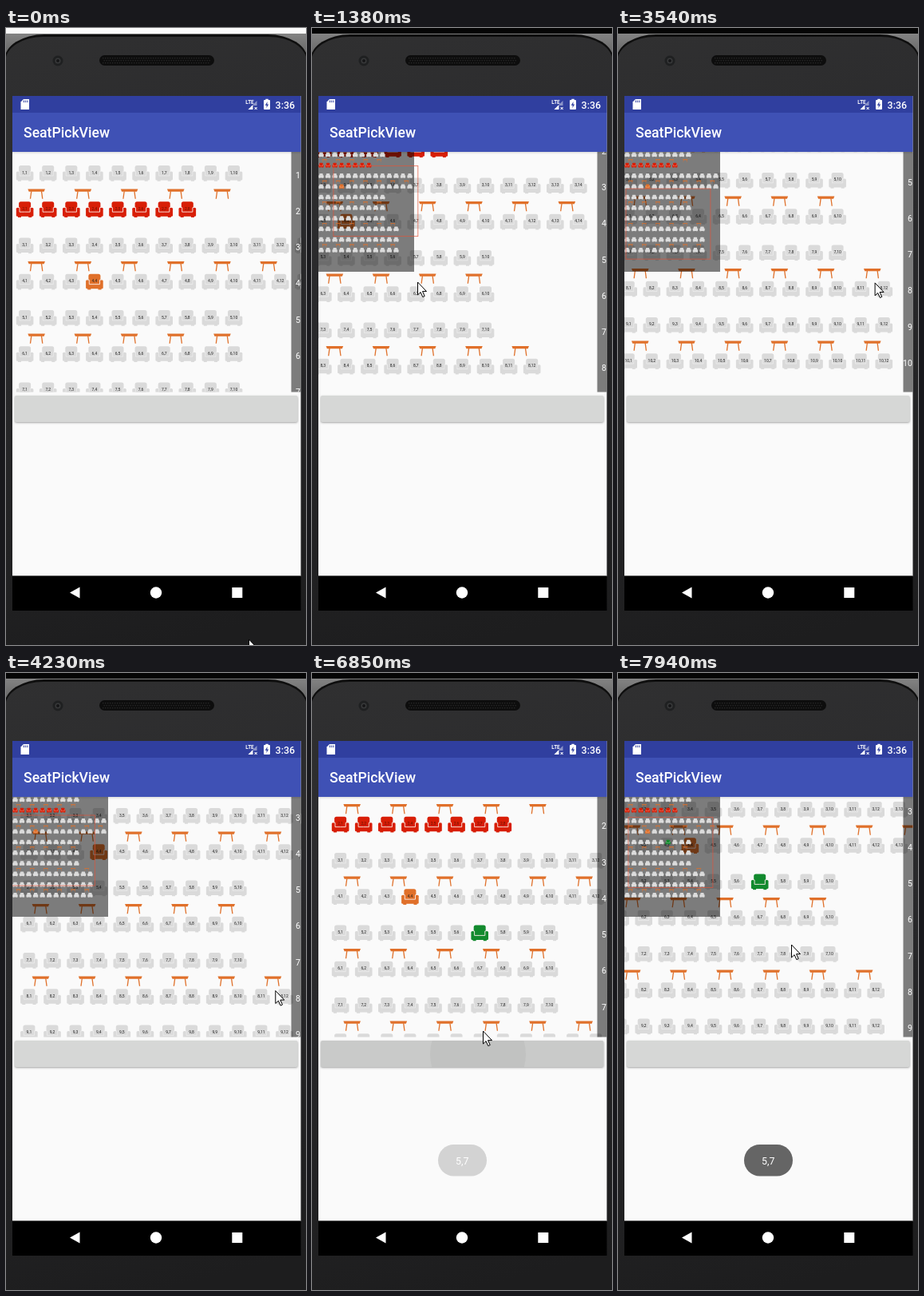
Write an HTML page with a canvas that moves like this. It is 376 px wide and 772 px high and loops after 8000 ms.

```html
<!DOCTYPE html>
<html lang="en">
<head>
<meta charset="utf-8">
<title>SeatPickView</title>
<style>
html, body { margin: 0; width: 376px; height: 772px; overflow: hidden; background: #222; }
canvas { display: block; }
</style>
</head>
<body>
<canvas id="stage" width="376" height="772"></canvas>
<script>
const g = document.getElementById('stage').getContext('2d');
const LOOP = 8000, STEP = 77.1, START = 446, PICK = 5610, PRESS = 6690, TOAST = 6845;
const COL = 29.1, ROW = 45.25, X0 = 23.6, Y0 = 181.7;
const MINI = 0.2935, MINI_X = 11.5, MINI_Y = 158.4;
const VIEW = [8, 155, 361.5, 300.5], PANEL = [8, 155, 120, 150];
const GREY = '#dadada', RED = '#d81e06', ORANGE = '#e0702a', GREEN = '#128a2e';

const seatCount = row => row === 2 ? 8 : row === 3 || row === 4 ? 14 : row < 8 ? 10 : 12;

// Straight pointer moves; a drag scrolls the seats by the distance covered.
const MOVES = [
  { from: 0, to: 292, x: 187, y: 418 },
  { from: START, to: 560, x: 200, y: 393 },
  { from: 560, to: 1371, x: 132, y: 318, drag: true },
  { from: 1371, to: 2300, x: 132, y: 211, drag: true },
  { from: 2300, to: 2527, x: 222, y: 243 },
  { from: 2640, to: 2900, x: 264, y: 309 },
  { from: 2900, to: 3600, x: 328, y: 320, drag: true },
  { from: 3800, to: 4530, x: 344, y: 453.5, drag: true },
  { from: 4530, to: 5220, x: 202, y: 317 },
  { from: 5340, to: 5450, x: 218, y: 355 },
  { from: 5960, to: 6600, x: 214, y: 448 },
  { from: 6900, to: 7250, x: 249.5, y: 404 },
  { from: 7250, to: 7924, x: 217, y: 340, drag: true },
];

const ramp = (t, a, b) => Math.min(1, Math.max(0, (t - a) / (b - a)));

function gesture(t) {
  let x = 304, y = 765, sx = 0, sy = 0;
  for (const m of MOVES) {
    const f = ramp(t, m.from, m.to);
    const dx = (m.x - x) * f, dy = (m.y - y) * f;
    x += dx;
    y += dy;
    if (m.drag) {
      sx -= dx;
      sy -= dy;
    }
    if (f < 1) break;
  }
  return { x, y, sx, sy };
}

function rect(x, y, w, h, fill) {
  g.fillStyle = fill;
  g.fillRect(x, y, w, h);
}

function round(x, y, w, h, r, fill) {
  g.fillStyle = fill;
  g.beginPath();
  g.roundRect(x, y, w, h, r);
  g.fill();
}

function disc(x, y, r, fill) {
  g.fillStyle = fill;
  g.beginPath();
  g.arc(x, y, r, 0, 7);
  g.fill();
}

function poly(points, fill) {
  g.fillStyle = fill;
  g.beginPath();
  for (let i = 0; i < points.length; i += 2) g.lineTo(points[i], points[i + 1]);
  g.closePath();
  g.fill();
}

function text(s, x, y, size, fill = '#fff', align = 'center', weight = 400) {
  g.font = `${weight} ${size}px Roboto, sans-serif`;
  g.textAlign = align;
  g.fillStyle = fill;
  g.fillText(s, x, y);
}

function shade(x0, y0, x1, y1, ...colors) {
  const s = g.createLinearGradient(x0, y0, x1, y1);
  colors.forEach((c, i) => s.addColorStop(i / (colors.length - 1), c));
  return s;
}

function clipped(box, paint, radius = 0) {
  g.save();
  g.beginPath();
  g.roundRect(...box, radius);
  g.clip();
  paint();
  g.restore();
}

function phone(t) {
  rect(0, 0, 376, 772, shade(0, 7, 0, 60, '#838383', '#4a4a4a'));
  rect(0, 0, 376, 7, t < START ? '#fbfbfb' : '#050505');
  round(-2, 8, 380, 800, { x: 50, y: 32 }, '#0e0e0e');
  round(-1, 11, 378, 800, { x: 48, y: 31 }, shade(0, 0, 200, 772, '#303031', '#28282a', '#1d1d1e'));
  disc(65, 41, 6.5, '#1f2021');
  disc(65, 41, 3.5, '#38393a');
  disc(65, 41, 2, '#161617');
  round(117, 34, 144, 13, 6.5, '#0d0d0d');
  for (let i = 0; i < 45; i++)
    for (let j = 0; j < 3; j++) rect(121 + i * 3 + j % 2 * 1.5, 37 + j * 3, 1.4, 1.4, '#262626');
}

function bars() {
  rect(8, 85, 361.5, 21, '#303f9f');
  rect(8, 106, 361.5, 49, '#3f51b5');
  text('SeatPickView', 22, 137, 17.6, '#fff', 'left', 500);
  text('3:36', 362, 100.5, 12.4, '#fff', 'right', 500);

  poly([22, 89, 29, 89, 29, 102, 18.5, 102, 18.5, 92.5], '#fff');
  for (let i = 0; i < 3; i++) rect(22 + i * 2.2, 90.5, 1, 2.7, '#303f9f');
  text('LTE', 305.5, 95, 6.4, '#fff', 'center', 700);
  poly([314.5, 91, 314.5, 102, 303.5, 102], '#8c95c9');
  poly([309, 96.5, 309, 102, 303.5, 102], '#fff');
  rect(310, 97, 6, 6, '#303f9f');
  text('×', 313, 102.5, 8, '#fff', 'center', 700);
  round(323, 90, 8, 12, 1, '#fff');
  rect(325.3, 88.8, 3.4, 2, '#fff');
  poly([327.6, 92, 324.8, 96.7, 326.7, 96.7, 326.4, 100, 329.2, 95.6, 327.3, 95.6], '#303f9f');

  rect(8, 685.4, 361.5, 43.6, '#000');
  poly([80, 706.5, 92.5, 699.5, 92.5, 713.5], '#fff');
  disc(188, 706.5, 7.2, '#fff');
  rect(283.3, 700, 13, 13, '#fff');
}

function seat(x, y, color) {
  g.save();
  g.translate(x, y);
  round(-7.5, -9.7, 15, 13, 2.5, color);
  round(-10.8, -2.2, 21.6, 11, 1.5, color);
  g.strokeStyle = color === GREY ? 'rgba(250,250,250,.5)' : '#fbeeea';
  g.lineWidth = 0.9;
  g.beginPath();
  for (const s of [-1, 1]) {
    rect(s * 6.6 - 2, 8, 4, 2, color);
    g.moveTo(s * 9.5, -2.8);
    g.lineTo(s * 6.6, -2.2);
    g.lineTo(s * 6.6, 3.2);
    g.lineTo(0, 3.2);
  }
  g.stroke();
  g.restore();
}

function table(x, y) {
  poly([x - 10.8, y - 6.6, x + 10.8, y - 6.6, x + 9.5, y - 3.4, x - 9.5, y - 3.4], ORANGE);
  for (const s of [-1, 1])
    poly([x + s * 7, y - 4, x + s * 5.7, y - 4, x + s * 7, y + 5.6, x + s * 8.3, y + 5.6], ORANGE);
}

function hall(picked, labels) {
  for (let row = 1; row <= 10; row++) {
    const count = seatCount(row), y = Y0 + (row - 1) * ROW;
    for (let col = 1; col <= count; col++) {
      const x = X0 + (col - 1) * COL;
      const green = picked && row === 5 && col === 7;
      seat(x, y, row === 2 ? RED : row === 4 && col === 4 ? ORANGE : green ? GREEN : GREY);
      if (labels && !green) text(`${row},${col}`, x, y + 0.8, 5, row === 2 ? '#6b1206' : '#222');
    }
    if (row % 2 === 0) {
      const tables = Math.max(count, seatCount(row - 1)) / 2;
      for (let i = 0; i < tables; i++) table(X0 + COL * (2 * i + 0.5), y - 18.8);
    }
  }
}

function overview(sx, sy, picked) {
  rect(...PANEL, 'rgba(0,0,0,.5)');
  clipped(PANEL, () => {
    g.translate(MINI_X, MINI_Y);
    g.scale(MINI, MINI);
    g.translate(-X0, -Y0);
    hall(picked, false);
  });
  g.strokeStyle = 'rgba(226,84,58,.85)';
  g.lineWidth = 0.8;
  g.strokeRect(MINI_X + (8 + sx - X0) * MINI, MINI_Y + (155 + sy - Y0) * MINI, 361 * MINI, 300 * MINI);
}

function seatView(t, sx, sy) {
  const picked = t >= PICK;
  clipped(VIEW, () => {
    g.save();
    g.translate(-sx, -sy);
    hall(picked, true);
    g.restore();
    rect(357.5, 155, 12, 301, 'rgba(0,0,0,.5)');
    for (let row = 1; row <= 10; row++)
      text(row, row < 10 ? 366 : 363, Y0 + (row - 1) * ROW - sy + 6, 10.5);
    if (t >= START && !picked || t >= 7300) overview(sx, sy, picked);
    rect(8, 155, 361.5, 3, shade(0, 155, 0, 158, 'rgba(0,0,0,.12)', 'rgba(0,0,0,0)'));
  });
}

function button(t) {
  const box = [11, 460, 354.5, 33];
  g.save();
  g.shadowColor = 'rgba(0,0,0,.35)';
  g.shadowBlur = 2.5;
  g.shadowOffsetY = 1;
  round(...box, 2, '#d6d7d6');
  g.restore();
  if (t < PRESS) return;
  const release = ramp(t, TOAST + 35, TOAST + 405), fade = 1 - release;
  clipped(box, () => {
    rect(...box, `rgba(0,0,0,${0.06 * fade})`);
    disc(208, 477, 20 + 40 * ramp(t, PRESS, TOAST) + 130 * release, `rgba(0,0,0,${0.04 * fade})`);
  }, 2);
}

function toast(t) {
  if (t < TOAST) return;
  g.globalAlpha = 0.26 + 0.74 * ramp(t, TOAST, TOAST + 235);
  round(158, 590, 61, 39.5, 19.7, '#656565');
  g.globalAlpha = 1;
  text('5,7', 188.3, 614.5, 12.4);
}

function pointer(x, y) {
  g.save();
  g.translate(x, y);
  poly([0.5, 0, 0.5, 16, 4.1, 12.6, 6.8, 18.6, 9.2, 17.5, 6.5, 11.6, 11.5, 11.6], '#fff');
  g.strokeStyle = '#000';
  g.lineWidth = 1;
  g.stroke();
  g.restore();
}

function draw(t) {
  // motion advances in even steps, like a screen capture
  const q = Math.max(0, START + STEP * Math.floor((t - START) / STEP));
  const { x, y, sx, sy } = gesture(q);
  phone(t);
  rect(8, 85, 361.5, 601, '#fafafa');
  bars();
  seatView(t, sx, sy);
  button(q);
  toast(q);
  pointer(x, y);
}

const begin = performance.now();
function tick() {
  draw((performance.now() - begin) % LOOP);
  requestAnimationFrame(tick);
}
tick();
</script>
</body>
</html>
```
